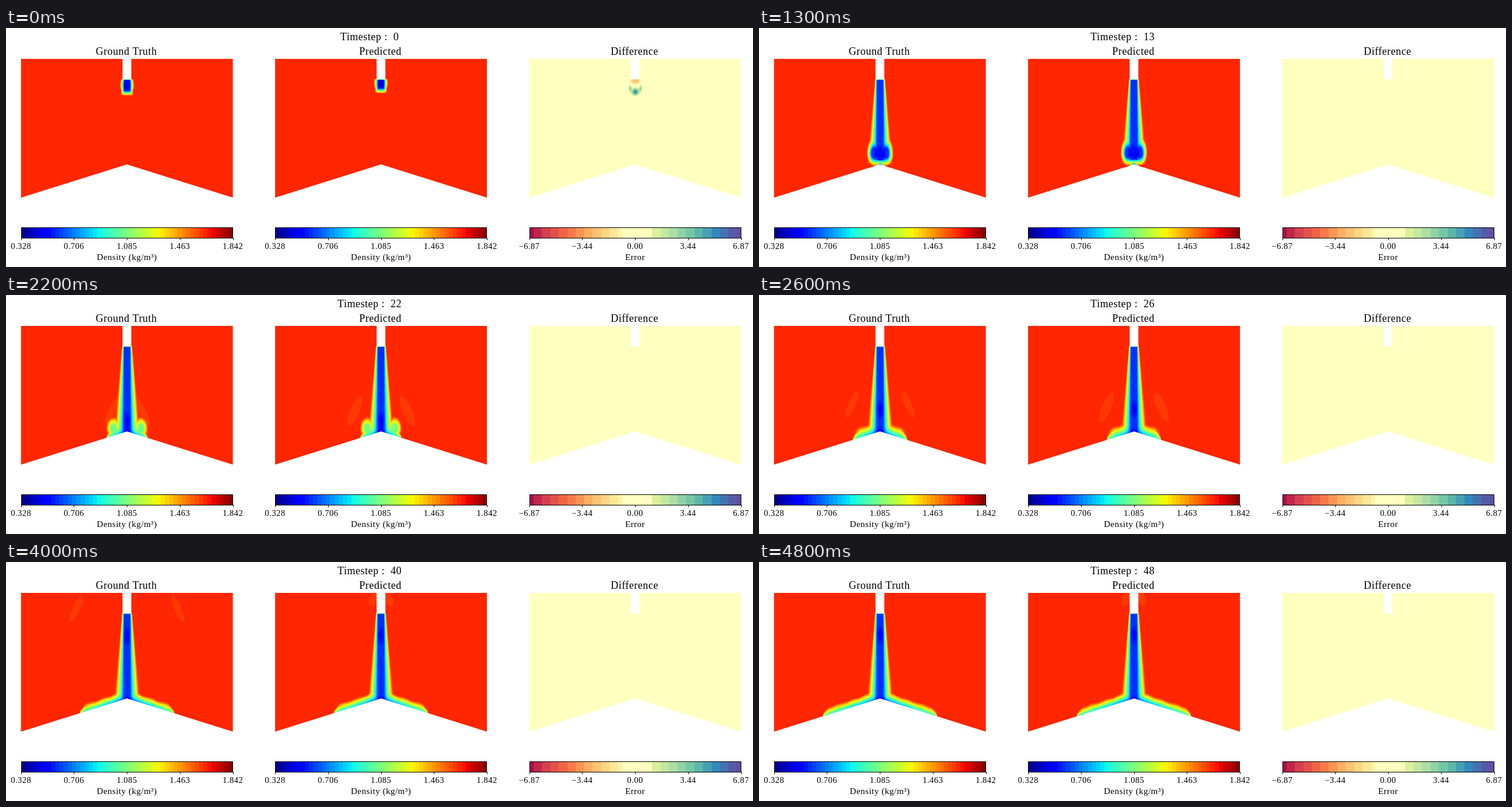
Animation, 1280 px wide and 410 px high, one loop 4.9 s. Source, as an HTML page with a canvas:

```html
<!DOCTYPE html>
<html lang="en">
<head>
<meta charset="utf-8">
<title>Density comparison</title>
<style>
html, body { margin: 0; width: 100%; height: 100%; overflow: hidden; background: #fff; }
canvas { display: block; }
</style>
</head>
<body>
<canvas id="stage" width="1280" height="410"></canvas>
<script>
const ctx = document.getElementById('stage').getContext('2d');
const STEPS = 49, STEP_MS = 100, LEVELS = 50;
const TOP = 53, WIDTH = 363, HEIGHT = 238, MIDDLE = WIDTH / 2;
const NOZZLE_END = 88, APEX = 234, SLOPE = 0.315;
const AMBIENT = 0.867, DEPTH = 0.69;
const panelLeft = i => 25.7 + 435.4 * i;

const clamp = (v, lo = 0, hi = 1) => Math.min(hi, Math.max(lo, v));
const bump = (a, b = 0) => Math.exp(-a * a - b * b);
const jetTip = t => 116 + 9.1 * t;

// Faint pressure waves: a bow wave beside the falling jet, later its reflection.
const bowWave = t => ({ x: 18, y: jetTip(t) - 57, length: 28, width: t > 4 && t < 12 ? 6 : 0 });

function trueWave(t) {
  if (t < 13) return bowWave(t);
  const d = t - 26;
  return {
    x: 48 + 4.6 * d - 0.13 * d * d,
    y: 187 - 4.5 * d - 0.23 * d * d,
    length: 25,
    width: t > 21 && t < 44 ? 6 : 0
  };
}

function predictedWave(t) {
  if (t < 13) return bowWave(t);
  if (t > 36) return { x: 13, y: 63, length: 13, width: 7 };
  const d = t - 18;
  return { x: 43 + 0.5 * d, y: 205 - 1.6 * d, length: 27, width: d > -3 && d < 12 ? 8 : 0 };
}

// Normalised density at distance u from the axis and height y.
function densityField(t, wave, lag) {
  const tip = jetTip(t) - lag;
  const fall = Math.min(98 + 9 * t - lag, 221);
  const spread = Math.max(0, t - 18);
  const head = {
    x: 0.8 * t + 1.5 * spread,
    y: fall + 2 * spread,
    rx: 12.5,
    ry: Math.max(8, Math.min(17 + 0.6 * t, 22) - 1.5 * spread),
    strength: clamp((27 - t) / 9)
  };
  const front = 24 + 2.95 * (t - 18) - 0.016 * (t - 18) ** 2;
  const film = (14 + 4 * bump((t - 26) / 5)) * clamp((t - 12) / 12);
  const coreY = Math.max(125, fall - 5 * Math.max(0, t - 21));
  const sin = Math.sin(0.41), cos = Math.cos(0.41);

  return (u, y) => {
    const above = APEX + SLOPE * u - y;
    const edge = 9 + 0.088 * (y - NOZZLE_END);
    const jet = clamp((edge - u) / (edge - 5)) * clamp((tip - y) / 9);

    const reach = y < head.y ? 1.3 * head.ry : head.ry;
    const r = Math.hypot((u - head.x) / head.rx, (y - head.y) / reach);
    const lobe = head.strength * clamp((1 - r) / 0.65);

    let layer = 0;
    if (u < front) {
      const height = (film + 8 * Math.exp(-u / 14)) * Math.sqrt(clamp((front - u) / 10))
        * (1 + 0.05 * Math.sin(u / 4 - t));
      layer = clamp(1 - above / height) * (1 - 0.35 * u / front);
    }

    const deficit = (jet ** 6 + lobe ** 6 + layer ** 6) ** (1 / 6) * clamp((y - 86) / 3);
    let n = AMBIENT - DEPTH * deficit;
    if (deficit > 0.5) return n - 0.06 * bump(u / 6, (y - coreY) / 14);
    if (deficit > 0.02) return n;

    const dx = u - wave.x, dy = y - wave.y;
    if (wave.width && Math.hypot((dx * sin + dy * cos) / wave.length,
      (dx * cos - dy * sin) / wave.width) < 1) n -= 0.02;
    if (t > 3 && t < 13) n += 0.03 * bump(u / 6, (y - tip - 2) / 4);
    if (t > 12 && t < 22 && above < 2 && u < front + 9) n += 0.04;
    return n;
  };
}

function errorField(t) {
  const tip = jetTip(t);
  const main = 0.15 * clamp((14 - t) / 6) + 0.25 * Math.exp(-t / 2);
  const early = 0.2 * Math.exp(-t / 1.5);
  return (u, y) => 0.5
    + main * bump(u / (6 + t), (y - tip + 7) / 6)
    + early * (bump((u - 9) / 2.6, (y - 103) / 6) - bump(u / 9, (y - 90) / 6));
}

// Trapezoid that rises over a..b and falls over c..d.
const trapezoid = (x, a, b, c, d, start = 0, end = 0) => Math.round(255 * Math.min(
  start + (1 - start) * clamp((x - a) / (b - a)),
  1 - (1 - end) * clamp((x - c) / (d - c))));

const levels = Array.from({ length: LEVELS }, (_, k) => k);
const JET = levels.map(k => {
  const x = (k + 0.5) / LEVELS;
  return [
    trapezoid(x, 0.35, 0.66, 0.89, 1, 0, 0.5),
    trapezoid(x, 0.125, 0.375, 0.64, 0.91),
    trapezoid(x, 0, 0.11, 0.34, 0.65, 0.5)
  ];
});

const SPECTRAL_STOPS = [0x9e0142, 0xd53e4f, 0xf46d43, 0xfdae61, 0xfee08b, 0xffffbf,
  0xe6f598, 0xabdda4, 0x66c2a5, 0x3288bd, 0x5e4fa2];
function spectral(x) {
  const p = clamp(x) * 10, i = Math.min(9, Math.floor(p));
  return [16, 8, 0].map(shift => {
    const a = SPECTRAL_STOPS[i] >> shift & 255, b = SPECTRAL_STOPS[i + 1] >> shift & 255;
    return Math.round(a + (b - a) * (p - i));
  });
}
// Neighbouring levels share a colour, and the levels around zero form one wide band.
const SPECTRAL = levels.map(k =>
  spectral(k >= 22 && k <= 28 ? 0.5 : (2 * (k + 1 >> 1) + 1) / LEVELS));

const buffer = document.createElement('canvas');
const AXIS = 182;
buffer.width = 2 * AXIS + 1;
buffer.height = HEIGHT;
const bufferCtx = buffer.getContext('2d');
const image = bufferCtx.createImageData(buffer.width, HEIGHT);

function drawField(left, field, colors) {
  for (let y = 0; y < HEIGHT; y++) {
    for (let u = 0; u <= AXIS; u++) {
      const level = clamp(Math.floor(field(u, y + TOP) * LEVELS), 0, LEVELS - 1);
      for (const x of [AXIS - u, AXIS + u]) {
        image.data.set([...colors[level], 255], 4 * (y * buffer.width + x));
      }
    }
  }
  bufferCtx.putImageData(image, 0, 0);

  const center = left + MIDDLE, bottom = TOP + HEIGHT;
  ctx.save();
  ctx.beginPath();
  for (const side of [-1, 1]) {
    ctx.moveTo(center, NOZZLE_END);
    ctx.lineTo(center + side * 7.5, NOZZLE_END);
    ctx.lineTo(center + side * 7.5, TOP);
    ctx.lineTo(center + side * MIDDLE, TOP);
    ctx.lineTo(center + side * MIDDLE, bottom);
    ctx.lineTo(center, APEX);
  }
  ctx.clip('evenodd');
  ctx.drawImage(buffer, Math.round(left) - 1, TOP);
  ctx.restore();
}

function text(string, x, y, size) {
  ctx.font = `${size}px "Liberation Serif", serif`;
  ctx.fillText(string, x, y);
}

function drawScale(left, colors, labels, caption) {
  colors.forEach((color, k) => {
    const x = Math.round(left + k * WIDTH / LEVELS);
    ctx.fillStyle = `rgb(${color})`;
    ctx.fillRect(x, 343, Math.round(left + (k + 1) * WIDTH / LEVELS) - x, 17);
  });
  ctx.strokeRect(Math.round(left) + 0.5, 342.5, WIDTH - 1, 18);
  ctx.fillStyle = '#000';
  labels.forEach((label, i) => {
    const x = left + i * WIDTH / 4;
    ctx.fillRect(Math.round(x), 360, 1, 4);
    text(label, x, 379, 14.5);
  });
  text(caption, left + MIDDLE, 398, 15);
}

const DENSITY = {
  colors: JET,
  labels: ['0.328', '0.706', '1.085', '1.463', '1.842'],
  caption: 'Density (kg/m³)'
};
const ERROR = {
  colors: SPECTRAL,
  labels: ['−6.87', '−3.44', '0.00', '3.44', '6.87'],
  caption: 'Error'
};
const PANELS = [
  { title: 'Ground Truth', scale: DENSITY, field: t => densityField(t, trueWave(t), 0) },
  { title: 'Predicted', scale: DENSITY, field: t => densityField(t, predictedWave(t), 4 * clamp(1 - t / 16)) },
  { title: 'Difference', scale: ERROR, field: errorField }
];

function draw(t) {
  ctx.fillStyle = '#fff';
  ctx.fillRect(0, 0, 1280, 410);
  ctx.fillStyle = ctx.strokeStyle = '#000';
  ctx.textAlign = 'center';
  ctx.letterSpacing = '0.5px';
  text(`Timestep :  ${t}`, 623, 21, 18);

  PANELS.forEach(({ title, scale, field }, i) => {
    const left = panelLeft(i);
    text(title, left + MIDDLE - 1, 46, 18);
    drawField(left, field(t), scale.colors);
    drawScale(left, scale.colors, scale.labels, scale.caption);
  });
}

let shown = -1;
function frame() {
  const t = Math.floor(performance.now() / STEP_MS) % STEPS;
  if (t !== shown) draw(shown = t);
  requestAnimationFrame(frame);
}
frame();
</script>
</body>
</html>
```
